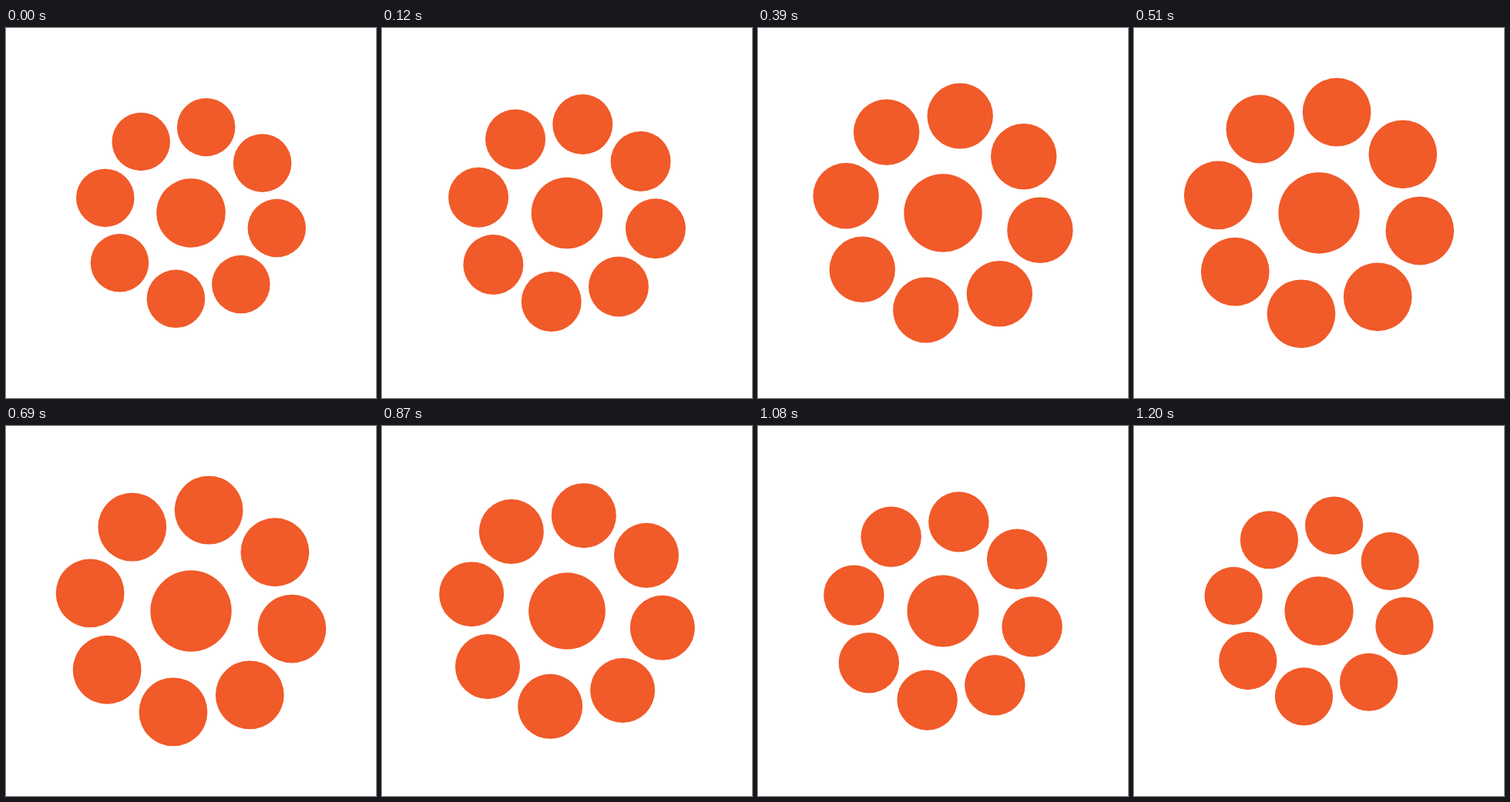
An HTML page for the animation above (1.23 s loop, 480x480 px).

```html
<!DOCTYPE html>
<html lang="en">
<head>
<meta charset="utf-8">
<title>Pulsing dots</title>
<style>
  html, body { margin: 0; height: 100%; overflow: hidden; background: #fff; }
  svg { display: block; width: 100%; height: 100%; }
</style>
</head>
<body>
<svg viewBox="-240 -240 480 480" fill="#f15a29">
  <g id="flower"><circle r="54.1"/></g>
</svg>
<script>
  const STEP = 30, STEPS = 41, PEAK = 20;
  const PETALS = 8, TILT = 10, RING = 136.5, PETAL_RADIUS = 45.6;
  const flower = document.getElementById('flower');

  for (let i = 0; i < PETALS; i++) {
    const angle = (TILT + i * 360 / PETALS) * Math.PI / 180;
    const petal = document.createElementNS('http://www.w3.org/2000/svg', 'circle');
    petal.setAttribute('cx', RING * Math.sin(angle));
    petal.setAttribute('cy', -RING * Math.cos(angle));
    petal.setAttribute('r', PETAL_RADIUS);
    flower.append(petal);
  }

  // Outer extent in pixels: a short rest, a linear rise, then a linear fall.
  function extentAt(step) {
    return step < PEAK
      ? 149 + 31 * Math.max(0, step - 1) / (PEAK - 1)
      : 180 - 31.5 * (step - PEAK) / (STEPS - 1 - PEAK);
  }

  const start = performance.now();
  function draw() {
    const step = Math.floor((performance.now() - start) / STEP) % STEPS;
    flower.setAttribute('transform', `scale(${extentAt(step) / 180})`);
    requestAnimationFrame(draw);
  }
  draw();
</script>
</body>
</html>
```
